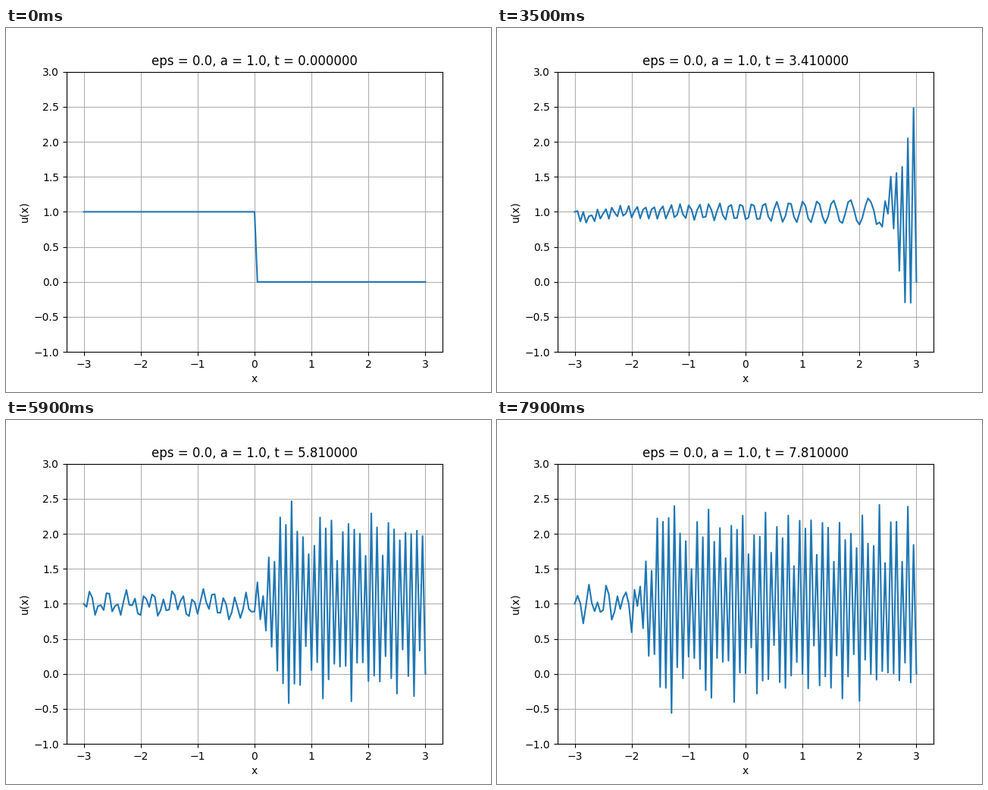
A matplotlib script for the animation above (8 s loop, 640 by 480 pixels).

```python
import numpy as np
import matplotlib.pyplot as plt
from matplotlib.animation import FuncAnimation

EPS, A = 0.0, 1.0
N = 121
DT = 0.001
FRAMES, INTERVAL = 80, 100

x = np.linspace(-3, 3, N)
dx = x[1] - x[0]


def advance(u, steps):
    """Forward Euler in time, central differences in space, fixed ends."""
    u = u.copy()
    for _ in range(steps):
        slope = (u[2:] - u[:-2]) / (2 * dx)
        bend = (u[2:] - 2 * u[1:-1] + u[:-2]) / dx**2
        u[1:-1] += DT * (EPS * bend - A * slope)
    return u


def solve():
    """Start state, one short first stretch, then a state every 0.1."""
    states = [(0.0, np.where(np.arange(N) <= N // 2, 1.0, 0.0))]
    for i in range(1, FRAMES):
        t, u = states[-1]
        steps = 10 if i == 1 else 100
        states.append((t + steps * DT, advance(u, steps)))
    return states


states = solve()

fig, ax = plt.subplots(figsize=(6.4, 4.8), dpi=100)
line, = ax.plot(x, states[0][1])
ax.set_ylim(-1, 3)
ax.set_xlabel("x")
ax.set_ylabel("u(x)")
ax.grid(True)


def draw(i):
    t, u = states[i]
    line.set_ydata(u)
    title = ax.set_title(f"eps = {EPS}, a = {A}, t = {t:.6f}")
    return line, title


anim = FuncAnimation(fig, draw, frames=FRAMES, interval=INTERVAL,
                     init_func=lambda: draw(0), repeat=True, repeat_delay=0)
plt.show()
```
